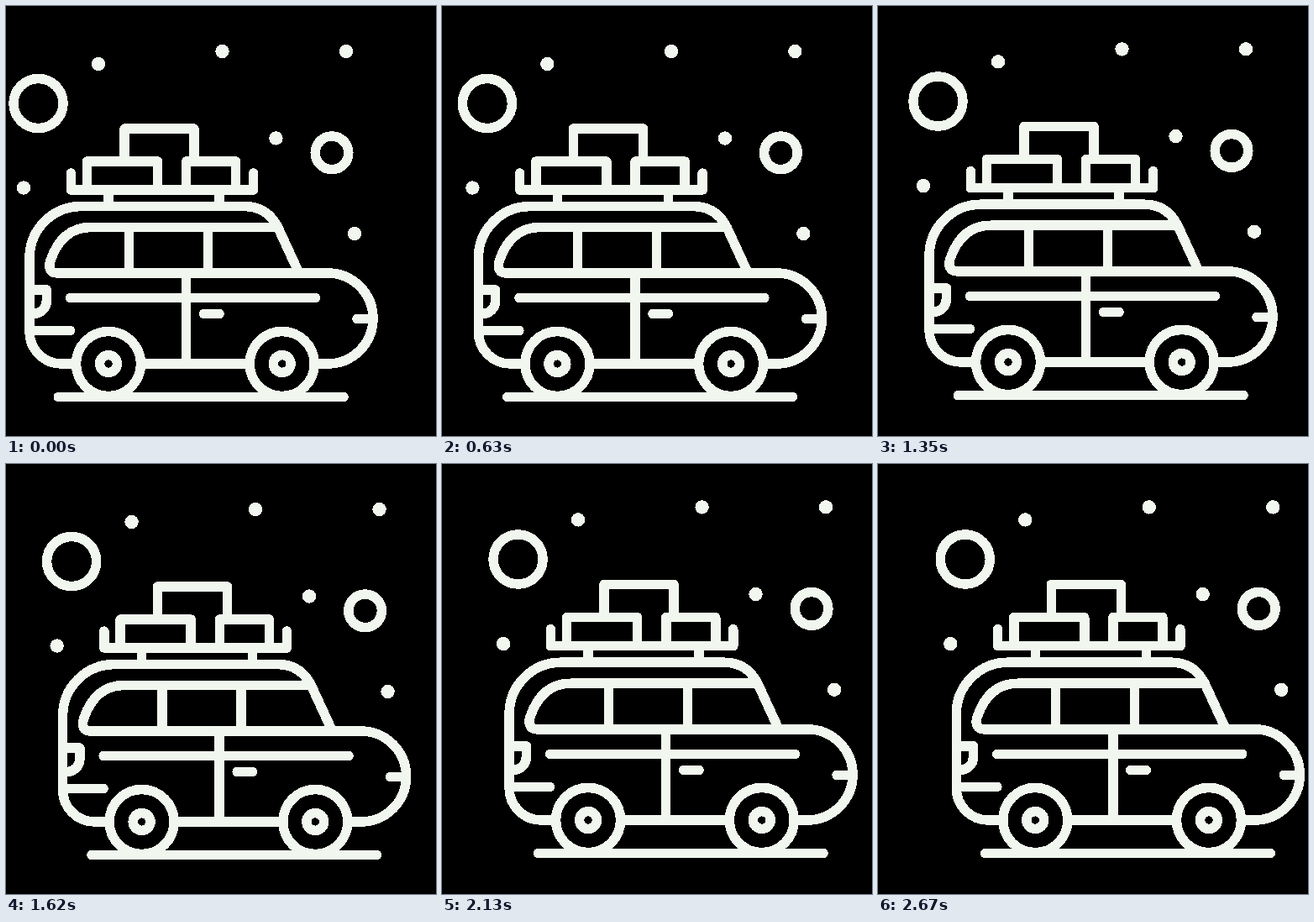
Recreate the animation shown at these times as an HTML page. Size 512 by 512 pixels, loop 2700 ms.

```html
<!DOCTYPE html>
<html lang="en">
<head>
<meta charset="utf-8">
<title>Road trip</title>
<style>
  html, body { margin: 0; width: 100%; height: 100%; overflow: hidden; background: #000; }
  svg { display: block; width: 100vw; height: 100vh; shape-rendering: crispEdges; }
  .lines { fill: none; stroke: #f1f7ee; stroke-width: 11.5; stroke-linecap: round; stroke-linejoin: round; }
  .dots { fill: #f1f7ee; stroke: none; }
</style>
</head>
<body>
<svg viewBox="0 0 512 512">
  <g id="scene" class="lines">
    <g class="dots">
      <circle cx="110" cy="69" r="8.2"/>
      <circle cx="257.5" cy="54" r="8.2"/>
      <circle cx="405" cy="54" r="8.2"/>
      <circle cx="321.5" cy="157.5" r="8.2"/>
      <circle cx="21" cy="216.5" r="8.2"/>
      <circle cx="415" cy="271" r="8.2"/>
    </g>
    <circle cx="38.5" cy="116" r="29.5"/>
    <circle cx="388" cy="174.8" r="19.8"/>

    <!-- luggage and rack -->
    <path d="M141 185V146H224V185M96.5 219V185H180.5V219M214.7 219V185H273.7V219"/>
    <path d="M77.3 199V219H294.7V199M122 219V238M254 219V238"/>

    <!-- body -->
    <path d="M83 426H66A38 38 0 0 1 28 388V300A61.5 61.5 0 0 1 89.5 238.5H284C305 238.5 317 250 324 264L348 316"/>
    <path d="M322 263.5H101C78 263.5 62 277 53 303C50 312 53 318 61 318H383A54 54 0 0 1 383 426H368M161 426H290"/>

    <!-- windows, door and trim -->
    <path d="M146.3 264V318M240.3 264V318M214.6 318V426M76.5 347.5H368.5M235.5 366.5H254M418 372.5H437"/>
    <path d="M28 338H48.3V351A15.5 15.5 0 0 1 32.8 366.5H28M28 386.5H76.5"/>

    <!-- wheels and ground -->
    <circle cx="122" cy="426" r="38.5"/>
    <circle cx="122" cy="426" r="10.4"/>
    <circle cx="328.7" cy="426" r="38.5"/>
    <circle cx="328.7" cy="426" r="10.4"/>
    <path d="M62.3 465.5H402"/>
  </g>
</svg>
<script>
  const LOOP = 2700, STEP = 30, BEAT = 540, REST = 240;
  const DRIFT = 66, HOP = 7.6, STRETCH = 0.005;
  const scene = document.getElementById('scene');

  function draw(now) {
    const t = Math.floor(now % LOOP / STEP) * STEP;
    const u = Math.max(0, (t % BEAT - REST) / (BEAT - REST));
    const lift = 4 * u * (1 - u);
    const x = DRIFT * t / LOOP;
    // The scene stretches slightly while it is in the air.
    scene.setAttribute('transform', `translate(${x} ${-HOP * lift}) scale(1 ${1 + STRETCH * lift})`);
    requestAnimationFrame(() => draw(performance.now()));
  }
  draw(performance.now());
</script>
</body>
</html>
```
